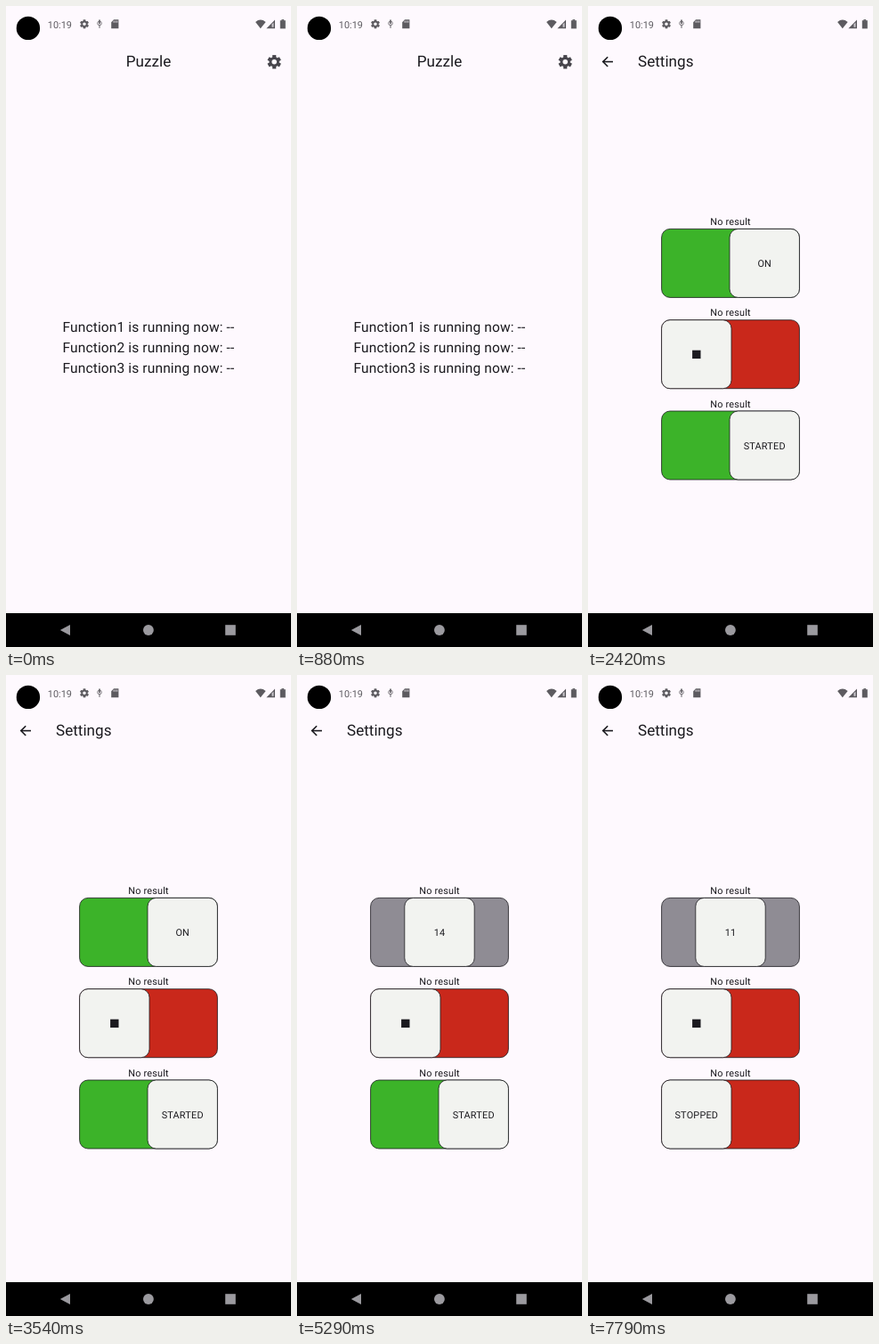
Write an HTML page with a canvas that moves like this. It is 320 px wide and 720 px high and loops after 8 s.

```html
<!DOCTYPE html>
<html lang="en">
<head>
<meta charset="utf-8">
<title>Puzzle</title>
<style>
  html, body { margin: 0; width: 100%; height: 100%; overflow: hidden; background: #fef9fe; }
  canvas { display: block; width: 320px; height: 720px; }
</style>
</head>
<body>
<canvas id="stage"></canvas>
<script>
const W = 320, H = 720, LOOP = 8000;
const BG = '#fef9fe', INK = '#1b1a1f', STATUS = '#5d5b60', NAV = '#9b9a9f', KNOB = '#f2f3f0';
const GREEN = [60, 179, 41], RED = [201, 40, 27], GREY = [143, 140, 148];

const canvas = document.getElementById('stage');
const ctx = canvas.getContext('2d');
const dpr = window.devicePixelRatio || 1;
canvas.width = W * dpr;
canvas.height = H * dpr;
ctx.textRendering = 'geometricPrecision';

const clamp = v => Math.min(1, Math.max(0, v));
const span = (t, from, to) => clamp((t - from) / (to - from));
const easeInOut = p => p * p * (3 - 2 * p);
const easeOut = p => 1 - (1 - p) ** 3;
const mix = (a, b, p) => a + (b - a) * p;
const mixColor = (a, b, p) => `rgb(${a.map((v, i) => Math.round(mix(v, b[i], p)))})`;

function text(str, x, y, size, { align = 'center', spacing = 0, color = INK } = {}) {
  ctx.font = `${size}px Roboto, sans-serif`;
  ctx.letterSpacing = spacing + 'px';
  ctx.textAlign = align;
  ctx.fillStyle = color;
  ctx.fillText(str, x, y);
}

function poly(points, color) {
  ctx.beginPath();
  points.forEach(([x, y]) => ctx.lineTo(x, y));
  ctx.closePath();
  ctx.fillStyle = color;
  ctx.fill();
}

function disc(x, y, r, color) {
  ctx.beginPath();
  ctx.arc(x, y, r, 0, Math.PI * 2);
  ctx.fillStyle = color;
  ctx.fill();
}

function ring(x, y, r, width, color) {
  ctx.beginPath();
  ctx.arc(x, y, r, 0, Math.PI * 2);
  ctx.lineWidth = width;
  ctx.strokeStyle = color;
  ctx.stroke();
}

function line(points, width, color) {
  ctx.beginPath();
  points.forEach(([x, y]) => ctx.lineTo(x, y));
  ctx.lineWidth = width;
  ctx.strokeStyle = color;
  ctx.stroke();
}

function gear(x, y, r, color) {
  ring(x, y, r * 0.55, r * 0.38, color);
  for (let i = 0; i < 6; i++) {
    const a = Math.PI * (i / 3 + 0.5), c = Math.cos(a), s = Math.sin(a);
    line([[x + c * r * 0.6, y + s * r * 0.6], [x + c * r, y + s * r]], r * 0.54, color);
  }
}

function box(x, y, w, h, r, color) {
  ctx.beginPath();
  ctx.roundRect(x, y, w, h, r);
  ctx.fillStyle = color;
  ctx.fill();
  ctx.lineWidth = 0.8;
  ctx.strokeStyle = INK;
  ctx.stroke();
}

// pos: 0 left, 1 right
function toggle(y, pos, color, label) {
  const x = 82.6, w = 154.8, h = 77, knob = 78.4;
  text('No result', 160, y - 4.4, 10.89, { spacing: 0.194 });
  box(x, y, w, h, 9.5, color);
  const kx = mix(x, x + w - knob, pos);
  box(kx, y, knob, h, 9.5, KNOB);
  const cx = kx + knob / 2;
  if (label) {
    text(label, cx, y + 42.6, 10.89, { spacing: 0.194 });
  } else {
    ctx.fillStyle = INK;
    ctx.fillRect(cx - 4.7, y + 34, 9.4, 9.4);
  }
}

function home() {
  text('Puzzle', 160, 68.4, 17.11);
  gear(301.2, 62.8, 7.7, '#47454c');
  for (let i = 0; i < 3; i++) {
    text(`Function${i + 1} is running now: --`, 160, 366 + i * 23, 15.56, { spacing: 0.117 });
  }
}

function settings(t) {
  line([[22.2, 57.2], [16.8, 62.6], [22.2, 68]], 1.6, INK);
  line([[16.8, 62.6], [28, 62.6]], 1.6, INK);
  text('Settings', 56, 68.4, 17.11, { align: 'left' });

  const first = easeInOut(span(t, 3540, 3770));
  const count = 15 - Math.max(0, Math.floor((t - 3630) / 1000));
  toggle(250.4, mix(1, 0.5, first), mixColor(GREEN, GREY, first), t < 3630 ? 'ON' : String(count));

  toggle(352.7, 0, `rgb(${RED})`, '');

  const third = easeInOut(span(t, 7290, 7600));
  toggle(455, 1 - third, mixColor(GREEN, RED, third), third < 0.5 ? 'STARTED' : 'STOPPED');
}

function statusBar() {
  disc(24.9, 24.9, 13.2, '#000');
  text('10:19', 46.8, 24.5, 10.9, { align: 'left', color: STATUS });
  gear(88, 20.3, 5, STATUS);

  // microphone
  ring(105, 19.4, 2.3, 0.8, STATUS);
  line([[105, 15.6], [105, 20.3]], 1.6, STATUS);
  line([[105, 22], [105, 24.8]], 1, STATUS);

  // memory card
  poly([[121, 15.3], [126.4, 15.3], [126.4, 25.3], [118.2, 25.3], [118.2, 18.2]], STATUS);
  for (let i = 0; i < 3; i++) line([[121 + i * 1.9, 16.6], [121 + i * 1.9, 18.7]], 0.8, BG);

  // wifi, signal, battery
  ctx.beginPath();
  ctx.moveTo(285.8, 25.3);
  ctx.lineTo(280.1, 18);
  ctx.quadraticCurveTo(285.8, 13.2, 291.6, 18);
  ctx.closePath();
  ctx.fillStyle = STATUS;
  ctx.fill();
  poly([[302, 15.4], [302, 25.2], [292.4, 25.2]], STATUS);
  poly([[300.5, 18.6], [300.5, 23.8], [298.5, 23.8], [298.5, 20.6]], '#cbc8cd');
  ctx.fillStyle = STATUS;
  ctx.fillRect(309.4, 15.1, 2.8, 1.5);
  ctx.fillRect(307.8, 16.2, 6, 9.2);
}

function navBar() {
  ctx.fillStyle = '#000';
  ctx.fillRect(0, 682, W, 38);
  poly([[60.8, 701], [72, 694.9], [72, 707.1]], NAV);
  disc(159.9, 701, 5.9, NAV);
  ctx.fillStyle = NAV;
  ctx.fillRect(246.2, 695.2, 11.6, 11.6);
}

function zoomed(scale, alpha, paint) {
  ctx.save();
  ctx.globalAlpha = alpha;
  ctx.translate(W / 2, H / 2);
  ctx.scale(scale, scale);
  ctx.translate(-W / 2, -H / 2);
  paint();
  ctx.restore();
}

function draw(t) {
  ctx.setTransform(dpr, 0, 0, dpr, 0, 0);
  ctx.fillStyle = BG;
  ctx.fillRect(0, 0, W, H);

  const move = easeOut(span(t, 1690, 2030));
  const fade = span(t, 1720, 1810);
  if (fade < 1) zoomed(1 + 0.05 * move, 1 - fade, home);
  if (fade > 0) zoomed(mix(0.85, 1, move), fade, () => settings(t));

  statusBar();
  navBar();
}

function frame() {
  draw(performance.now() % LOOP);
  requestAnimationFrame(frame);
}
frame();
</script>
</body>
</html>
```
